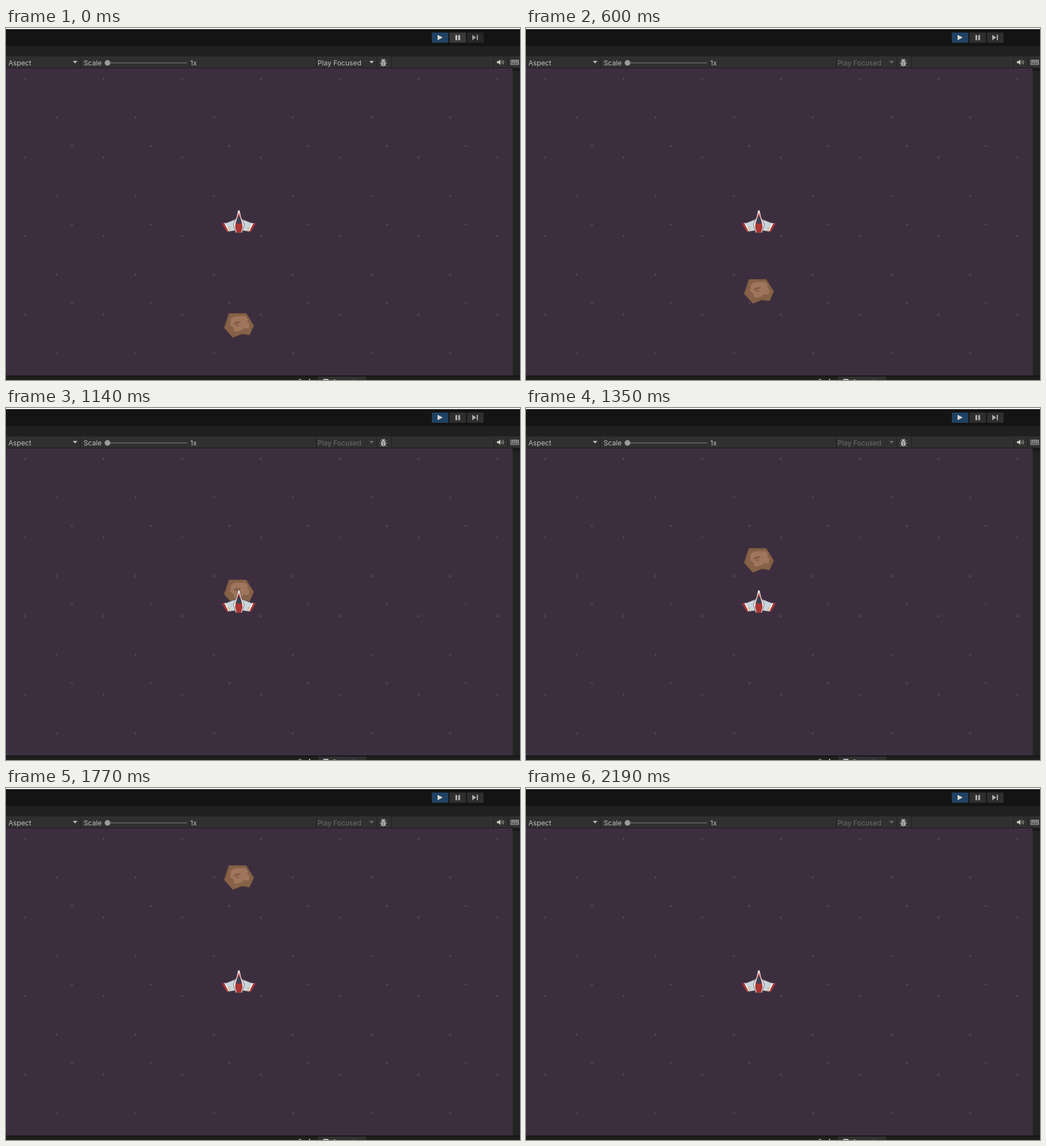
An HTML page with a canvas that plays this animation: 904 px wide and 620 px high, repeating every 2.79 s.

```html
<!DOCTYPE html>
<html lang="en">
<head>
<meta charset="utf-8">
<title>Asteroid passing a ship</title>
<style>
  html, body { margin: 0; width: 100%; height: 100%; overflow: hidden; background: #141414; }
  canvas { display: block; }
</style>
</head>
<body>
<canvas id="stage" width="904" height="620"></canvas>
<script>
const ctx = document.getElementById('stage').getContext('2d');
const LOOP = 2790;
const range = (from, to, step) =>
  Array.from({ length: Math.floor((to - from) / step) + 1 }, (_, i) => from + i * step);

// The picture only updates at these moments.
const ticks = [0, 200, 270, 470, 540, ...range(600, 950, 70), 1010, 1080, ...range(1140, 2190, 70)];

// Top edge of the asteroid: [time, y]
const flight = [[0, 502], [200, 499], [270, 496], [470, 478], [600, 442], [880, 372], [1140, 302],
  [1490, 209.5], [1560, 188], [1910, 101], [2050, 63], [2120, 44], [2190, 20]];

function asteroidTop(t) {
  const i = flight.findIndex(([time]) => time >= t);
  if (i <= 0) return flight[0][1];
  const [t0, y0] = flight[i - 1], [t1, y1] = flight[i];
  return y0 + (y1 - y0) * (t - t0) / (t1 - t0);
}

function rect(color, x, y, w, h) {
  ctx.fillStyle = color;
  ctx.fillRect(x, y, w, h);
}

function shape(path, fill, stroke, width = 1) {
  const p = new Path2D(path);
  if (fill) { ctx.fillStyle = fill; ctx.fill(p); }
  if (stroke) { ctx.strokeStyle = stroke; ctx.lineWidth = width; ctx.stroke(p); }
}

function disc(color, x, y, rx, ry = rx, angle = 0) {
  ctx.fillStyle = color;
  ctx.beginPath();
  ctx.ellipse(x, y, rx, ry, angle, 0, 2 * Math.PI);
  ctx.fill();
}

function label(text, x, y, color = '#bebebe', align = 'left') {
  ctx.font = '12.2px Inter, sans-serif';
  ctx.textAlign = align;
  ctx.fillStyle = color;
  ctx.fillText(text, x, y);
}

const dropArrow = (x, color) => shape(`M${x} 58h8l-4 4.5z`, color);

function space() {
  const period = 138.5;
  rect('#3c2e3f', 0, 71, 891, 541);
  for (let x = 0; x < 891; x += period) {
    for (let y = -56.5; y < 612; y += period) {
      for (const [dx, dy] of [[33, 146], [89, 214], [116, 264]]) {
        rect('#574a5a', x + dx - 2.5, y + dy - .5, 5, 1);
        rect('#574a5a', x + dx - .5, y + dy - 2.5, 1, 5);
      }
      for (const [dx, dy] of [[10, 151.5], [85, 167], [24, 188.5], [111, 229], [59, 242]])
        rect('#514354', x + dx - 1, y + dy - .5, 2, 1);
    }
  }
}

function asteroid(top) {
  ctx.save();
  ctx.translate(383, top);
  shape('M9 .5H39.5L53 22 45.5 39 32 37 16 43.5.5 26z', '#856147', '#604637');
  shape('M12 11L18 6 37 5.5 43 11 41 15 45 19 44 27 35 27 30 31.5 21 33 17 31 18 27 11 21z', '#9f755b');
  const crater = '#7b5942';
  disc(crater, 21.5, 17.5, 4, 1.8, -.6);
  disc(crater, 27, 16, 2.4, 1.3, -.6);
  disc(crater, 24.5, 21.5, 2.2, 1.3, -.5);
  ctx.restore();
}

function wing() {
  shape('M-4 15L-24 23-29.5 23-21 38-6 36z', '#c9d5dd', '#54454e');
  shape('M-29.5 23.5L-25 22.5-18 37-21 38z', '#a8302f');
  shape('M-25.5 23L-23.5 22-16.5 36.5-18.5 37z', '#f0f2f2');
  shape('M-20 30L-16 29-15 36-17 36.5z', '#d3bf98');
}

function ship() {
  ctx.save();
  ctx.translate(409.5, 321);
  wing();
  ctx.scale(-1, 1);
  wing();
  shape('M-1.5 0H1.5L4 12 9.5 25 5.5 39.5H-5.5L-9.5 25-4 12z', '#f3f4f3', '#594850', .8);
  shape('M0 4L3.5 15 6 24 6.5 30 4 39.5H-4L-6.5 30-6 24-3.5 15z', '#a93632');
  shape('M0 10L2.5 14 5 23.5H-5L-2.5 14z', '#374255');
  ctx.restore();
}

function playbackButtons(t) {
  const settle = Math.min(1, Math.max(0, (t - 130) / 340));
  const grey = (from, to) => `rgb(${Array(3).fill(Math.round(from + (to - from) * settle))})`;
  rect('#204263', 749, 8, 29, 18);
  rect(grey(57, 46), 780, 8, 29, 18);
  rect(grey(38, 46), 811, 8, 29, 18);
  shape('M759 12L768 16.8 759 21.5z', '#d6d6d0');
  const pause = grey(205, 180), step = grey(155, 175);
  rect(pause, 790.5, 12.5, 3, 9);
  rect(pause, 795.5, 12.5, 3, 9);
  shape('M820 12L827 16.8 820 21.5z', step);
  rect(step, 828, 12, 2, 9.5);
}

function bugIcon() {
  shape('M658 57L661 60M669.500 57L666.500 60M657 62H670.500M658 67L661 64.500M669.500 67L666.500 64.500M661 54L662.500 56.500M666.500 54L665 56.500',
    null, '#aaa');
  disc('#b0b0b0', 663.75, 57.2, 2.7, 2.2);
  disc('#b0b0b0', 663.75, 62.8, 3.9, 5);
  rect('#555', 663.3, 59, 1, 8);
}

function toolbar(t) {
  const locked = t >= 200;
  rect('#141414', 0, 0, 904, 32);
  rect('#f3f6f5', 0, 0, 904, 2);
  rect('#202020', 0, 32, 904, 18);
  rect('#303030', 0, 50, 904, 20);
  rect('#1b1b1b', 0, 70, 904, 1);
  for (const x of [130, 545, 652, 677, 857, 882]) rect('#1e1e1e', x, 51, 1, 19);
  playbackButtons(t);

  label('9 Aspect', 44.5, 65.5, '#bebebe', 'right');
  dropArrow(117.5, '#bebebe');
  label('Scale', 136.5, 66);
  rect('#5c5c5c', 180, 60.5, 138.5, 2);
  disc('#9b9b9b', 178.5, 61.5, 5);
  label('1x', 324, 66);
  const focus = locked ? '#6d6d6d' : '#bebebe';
  label('Play Focused', 548, 65.5, focus);
  dropArrow(639, focus);
  bugIcon();

  shape('M863.500 58.500h2.500l3.500-3v9.500l-3.500-3h-2.500z', '#d0d0c8');
  shape('M871.500 58q2 2.300 0 4.500M873.500 56.500q3.500 3.800 0 7.500', null, '#c4c4bc');
  shape('M888 56.500H901.500V64.500H888zM888 59H901.500M888 62H901.500M891.500 56.500V62M895 56.500V62M898.500 56.500V62', null, '#b0b0b0');
}

function edges() {
  rect('#232323', 891, 71, 13, 541);
  rect('#1a1a1a', 891, 71, 13, 5);
  rect('#151515', 0, 612, 904, 2);
  rect('#1e1e1e', 0, 614, 904, 6);
  rect('#313131', 549, 614, 84, 6);
  label('?', 514, 626.5);
  rect('#bebebe', 533, 618, 2, 2);
  rect('#bebebe', 558, 618, 9, 2);
  label('Console', 573, 627.5);
}

function draw(now) {
  const time = now % LOOP;
  const t = ticks.filter(tick => tick <= time).pop() ?? 0;
  space();
  if (t < 2190) asteroid(asteroidTop(t));
  ship();
  toolbar(t);
  edges();
}

const start = performance.now();
function frame() {
  draw(performance.now() - start);
  requestAnimationFrame(frame);
}
frame();
</script>
</body>
</html>
```
